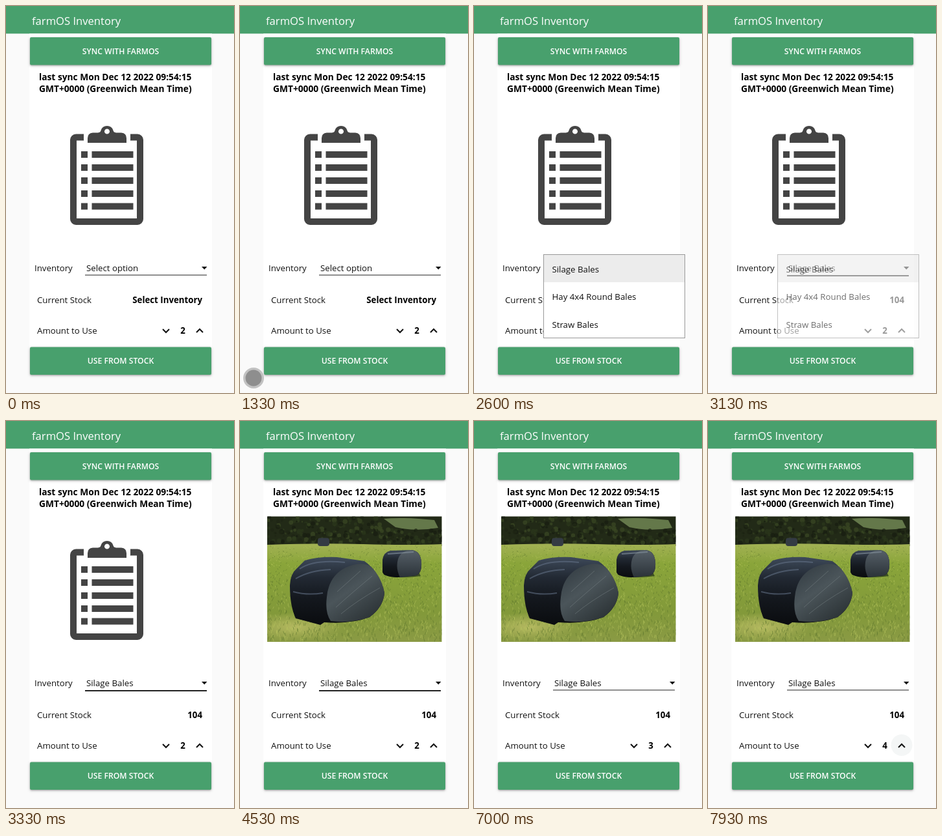
These frames come from a looping animation (352x594 px, 8 s). An HTML page:

```html
<!DOCTYPE html>
<html lang="en">
<head>
<meta charset="utf-8">
<title>farmOS Inventory</title>
<style>
  html, body { margin: 0; width: 100%; height: 100%; overflow: hidden; background: #fafafa; }
  svg { display: block; }
  text { font: 13.25px "Open Sans", "Noto Sans", sans-serif; fill: #111; }
  .title { font-size: 16.6px; font-weight: 500; fill: #fff; }
  .bold { font-weight: 700; fill: #000; }
  .sync { font-size: 13.75px; }
  .label { font-size: 12.2px; font-weight: 600; fill: #fff; text-anchor: middle; }
  .button { fill: #48a06d; filter: drop-shadow(0 1px 1px rgba(0, 0, 0, .25)) drop-shadow(0 1px 2px rgba(0, 0, 0, .2)); }
  .chevron { fill: none; stroke: #111; stroke-width: 2; }
</style>
</head>
<body>
<svg width="352" height="594" viewBox="0 0 352 594">
  <defs>
    <linearGradient id="field" x2="0" y2="1">
      <stop offset="0" stop-color="#a3b254"/>
      <stop offset=".2" stop-color="#8aa53a"/>
      <stop offset=".7" stop-color="#82993a"/>
      <stop offset="1" stop-color="#8a9a44"/>
    </linearGradient>
    <linearGradient id="wrap" x2="0" y2="1">
      <stop offset="0" stop-color="#3e4a5a"/>
      <stop offset=".3" stop-color="#222933"/>
      <stop offset=".6" stop-color="#14181e"/>
      <stop offset="1" stop-color="#0a0c0f"/>
    </linearGradient>
    <linearGradient id="face" x2=".7" y2="1">
      <stop offset="0" stop-color="#2f383f"/>
      <stop offset=".5" stop-color="#4b555a"/>
      <stop offset="1" stop-color="#2c3336"/>
    </linearGradient>
    <linearGradient id="farFace" x2="0" y2="1">
      <stop offset="0" stop-color="#566068"/>
      <stop offset="1" stop-color="#2b3238"/>
    </linearGradient>
    <radialGradient id="sunny">
      <stop offset="0" stop-color="#b4b860"/>
      <stop offset="1" stop-color="#b4b860" stop-opacity="0"/>
    </radialGradient>
    <clipPath id="frame"><path d="M42 146.500H311.500V339H42z"/></clipPath>
  </defs>

  <rect width="352" height="42.400" fill="#48a06d"/>
  <text class="title" x="40" y="28.500">farmOS Inventory</text>
  <rect x="36" y="42.400" width="282" height="524.600" fill="#fff"/>
  <rect class="button" x="37" y="48" width="280" height="42.500" rx="2"/>
  <text class="label" x="177" y="74">SYNC WITH FARMOS</text>
  <text class="bold sync" x="51" y="114">last sync Mon Dec 12 2022 09:54:15</text>
  <text class="bold sync" x="51" y="132">GMT+0000 (Greenwich Mean Time)</text>

  <g id="clipboard" fill="#444">
    <rect x="104" y="201.500" width="103" height="129.500" rx="4" fill="none" stroke="#444" stroke-width="10"/>
    <path d="M120 195H192V205Q192 214 184 214H128Q120 214 120 205z" fill="#fff"/>
    <path fill-rule="evenodd" d="M126 210V203Q126 195 134 194.500H142Q146 194 146.500 191A10 10 0 0 1 165.500 191Q166 194 170 194.500H178Q186 195 186 203V210zM156 188.500a4 4 0 1 0 .01 0z"/>
    <path stroke="#444" stroke-width="10" d="M116 228h10m6.500 0h64M116 248h10m6.500 0h64M116 268h10m6.500 0h64M116 288h10m6.500 0h64M116 307.500h10m6.500 0h64"/>
  </g>

  <g id="photo" clip-path="url(#frame)">
    <rect x="42" y="146" width="270" height="46" fill="#222a17"/>
    <path d="M222 150Q250 147 300 152L306 164Q270 170 240 163z" fill="#64784a"/>
    <g id="leaves"></g>
    <path d="M42 190Q120 187 190 189T312 189V339H42z" fill="url(#field)"/>
    <ellipse cx="85" cy="316" rx="75" ry="22" fill="url(#sunny)"/>
    <path id="lightGrass" stroke="#bccb62" stroke-opacity=".45"/>
    <path id="darkGrass" stroke="#56702a" stroke-opacity=".5"/>
    <rect x="120" y="179.500" width="18" height="12.500" rx="4" fill="#343b43"/>
    <path d="M222 236Q240 243 279 238L276 232H222z" fill="#3d5122"/>
    <path d="M220 213Q222 201 232 199L266 198Q279 200 280 217T272 237L243 240Q222 239 220 232z" fill="url(#wrap)"/>
    <path d="M244 212Q248 199 264 198Q279 200 280 217T272 237L247 240Q240 226 244 212z" fill="url(#farFace)"/>
    <path d="M228 204L268 201" stroke="#8794a2" stroke-opacity=".6" stroke-width="2"/>
    <path d="M77 252Q78 234 88 226L100 214Q120 208 150 209L192 215Q216 232 223 264Q221 286 200 301Q172 312 130 309L124 313Q98 306 86 303Q77 284 77 252z" fill="url(#wrap)"/>
    <path d="M134 270Q137 238 163 225Q188 214 203 224Q219 241 223 264Q221 286 200 301Q172 311 140 307Q131 294 134 270z" fill="url(#face)"/>
    <path d="M92 227Q114 212 162 217M82 262Q104 268 128 264M86 242Q108 229 140 228" fill="none" stroke="#66758a" stroke-opacity=".55" stroke-width="2"/>
    <path d="M148 286Q170 266 204 238M156 296Q180 276 216 256M150 262Q168 246 186 230" fill="none" stroke="#7f898d" stroke-opacity=".45"/>
  </g>

  <text x="44" y="407">Inventory</text>
  <text id="option" x="124" y="407"></text>
  <path d="M302 400h8.500l-4.250 4.500z" fill="#111"/>
  <rect id="underline" x="122" width="188" fill="#222"/>
  <text x="48" y="456">Current Stock</text>
  <text id="stock" class="bold" x="303" y="456" text-anchor="end"></text>
  <text x="48" y="503">Amount to Use</text>
  <text id="amount" class="bold" x="273" y="503" text-anchor="middle"></text>
  <circle id="halo" cx="299" cy="497.500" r="16.500" fill="#f4f6f6"/>
  <circle id="ripple" cx="299" cy="497.500"/>
  <path class="chevron" d="M242 496l5 5 5-5M294 501l5-5 5 5"/>
  <rect class="button" x="37" y="523.500" width="280" height="42.500" rx="2"/>
  <text class="label" x="177" y="549">USE FROM STOCK</text>

  <g id="menu">
    <rect x="107.500" y="381.500" width="218" height="128" fill="#fff" stroke="#999"/>
    <rect x="108" y="382" width="217" height="42" fill="#ececec"/>
    <text x="120.500" y="409">Silage Bales</text>
    <text x="120.500" y="451">Hay 4x4 Round Bales</text>
    <text x="120.500" y="494">Straw Bales</text>
  </g>

  <g id="touch">
    <circle r="16" fill="#c2c2c2"/>
    <circle r="12.500" fill="#8e8e8e"/>
  </g>
</svg>

<script>
const $ = id => document.getElementById(id);
const set = (id, attrs) => {
  for (const key in attrs) $(id).setAttribute(key, attrs[key]);
};
const show = (id, on) => { $(id).style.display = on ? '' : 'none'; };
const clamp = x => Math.min(1, Math.max(0, x));

let seed = 7;
const random = () => (seed = seed * 16807 % 2147483647) / 2147483647;

// Blades get longer towards the viewer.
function grass(count) {
  let d = '';
  for (let i = 0; i < count; i++) {
    const depth = random();
    const x = 42 + random() * 270;
    const y = 192 + depth * 147;
    d += `M${x.toFixed(1)} ${y.toFixed(1)}l${(random() * 4 - 2).toFixed(1)} ${(-1 - depth * 4).toFixed(1)}`;
  }
  return d;
}

function foliage(count) {
  const tones = ['#171d10', '#2c381c', '#3b4924', '#1e2615'];
  let out = '';
  for (let i = 0; i < count; i++) {
    const x = 42 + random() * 270;
    const top = x > 220 ? 166 : 147;
    const y = top + random() * (188 - top);
    out += `<circle cx="${x}" cy="${y}" r="${1 + random() * 3}" fill="${tones[i % 4]}" opacity=".7"/>`;
  }
  return out;
}

set('lightGrass', { d: grass(800) });
set('darkGrass', { d: grass(800) });
$('leaves').innerHTML = foliage(260);

const LOOP = 8000;
const TICKS_PER_MS = 0.015;

function touchPoint(tick) {
  if (tick >= 9 && tick < 11) return [16, 473];
  if (tick >= 20 && tick < 39) return [21, 571];
  if (tick === 76) return [56, 579];
}

function draw(now) {
  const tick = Math.floor((now % LOOP + 4) * TICKS_PER_MS);
  const chosen = tick >= 46;
  const loaded = tick >= 68;

  show('photo', loaded);
  show('clipboard', !loaded);
  $('option').textContent = chosen ? 'Silage Bales' : 'Select option';
  $('stock').textContent = chosen ? '104' : 'Select Inventory';
  $('amount').textContent = tick < 105 ? 2 : tick < 112 ? 3 : 4;
  const focused = tick >= 27 && tick < 105;
  set('underline', { height: focused ? 2 : 1, y: focused ? 413 : 412.5 });

  const opened = clamp((tick - 26) / 5);
  const closed = clamp((tick - 45) / 5);
  set('menu', { opacity: opened - closed });

  set('halo', { opacity: clamp((tick - 105) / 5) });
  const spread = tick < 112 ? clamp((tick - 105) / 5) : clamp((tick - 111) / 8);
  set('ripple', { r: 14 * Math.sqrt(spread), opacity: 0.16 * (1 - spread) });

  const point = touchPoint(tick);
  show('touch', point);
  if (point) set('touch', { transform: `translate(${point})` });
}

const start = performance.now();
function loop() {
  draw(performance.now() - start);
  requestAnimationFrame(loop);
}
loop();
</script>
</body>
</html>
```
